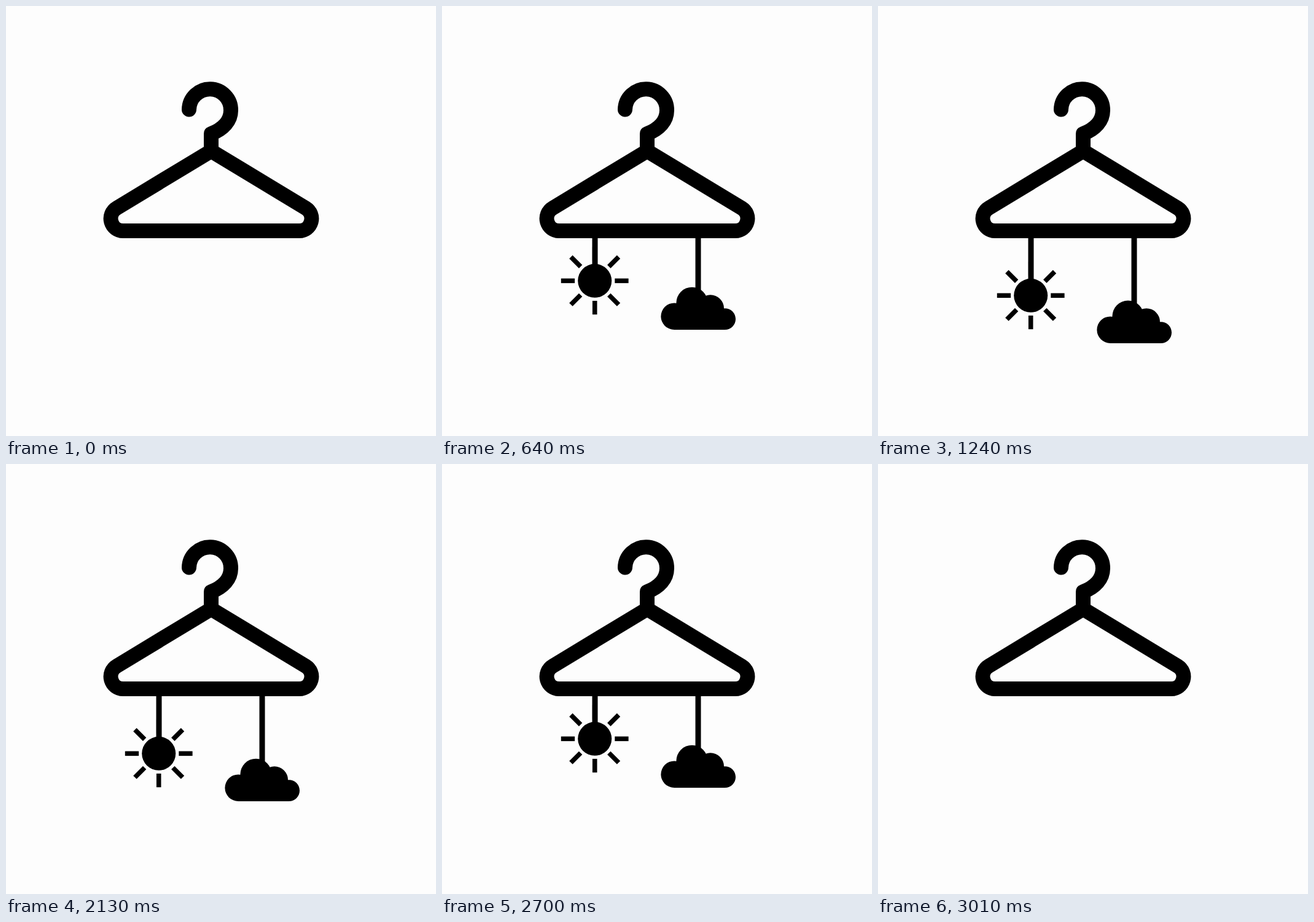
These frames come from a looping animation (700x700 px, 3340 ms). An HTML page:

```html
<!DOCTYPE html>
<html lang="en">
<head>
<meta charset="utf-8">
<title>Hanger mobile</title>
<style>
  html, body { margin: 0; width: 100%; height: 100%; overflow: hidden; background: #fdfdfd; }
  svg { display: block; width: 100vw; height: 100vh; }
  .line { fill: none; stroke: #000; stroke-width: 24; }
  .string { stroke: #000; stroke-width: 9; }
</style>
</head>
<body>
<svg viewBox="0 0 700 700">
  <path class="string" id="sunString" />
  <path class="string" id="cloudString" />

  <g id="sun">
    <circle cx="248.7" cy="471.3" r="27.5" />
    <g id="rays" stroke="#000" stroke-width="7.6"></g>
  </g>

  <g id="cloud">
    <circle cx="378.2" cy="527.2" r="21.8" />
    <circle cx="407" cy="505.2" r="25.6" />
    <circle cx="437" cy="514.2" r="22" />
    <circle cx="460.6" cy="531.6" r="17.4" />
    <rect x="378" y="520" width="82.6" height="29" />
  </g>

  <path class="line" stroke-linecap="round" stroke-linejoin="round"
    d="M298 168.5 A34 34 0 0 1 366 170 C366 187 354 200 334 208 V236" />
  <path class="line"
    d="M334 236 L180.2 328.9 A20 20 0 0 0 190.5 366 H477.5 A20 20 0 0 0 487.8 328.9 Z" />
</svg>
<script>
  const LOOP = 3340;
  const HALF = 1670;
  const CLOUD_RATIO = 11 / 12;

  // time (ms), sun offset below rest (px), speed (px/ms)
  const KEYS = [
    [330, 300, -1],
    [420, 194, -1.4],
    [646, -24.2, 0],
    [798, 7.5, 0],
    [940, -3, 0],
    [1090, 0.6, 0],
    [1230, 0, 0]
  ];

  const byId = id => document.getElementById(id);
  const sun = byId('sun');
  const cloud = byId('cloud');
  const sunString = byId('sunString');
  const cloudString = byId('cloudString');

  for (let angle = 0; angle < 360; angle += 45) {
    const ray = document.createElementNS('http://www.w3.org/2000/svg', 'path');
    ray.setAttribute('d', 'M281.3 471.3 H303.6');
    ray.setAttribute('transform', `rotate(${angle} 248.7 471.3)`);
    byId('rays').append(ray);
  }

  // Cubic Hermite between neighbouring keys
  function offsetAt(t) {
    const i = KEYS.findIndex(key => key[0] > t);
    if (i === 0) return KEYS[0][1];
    if (i < 0) return 0;
    const [t0, p0, v0] = KEYS[i - 1];
    const [t1, p1, v1] = KEYS[i];
    const d = t1 - t0;
    const u = (t - t0) / d;
    const w = 1 - u;
    return p0 * w * w * (1 + 2 * u) + p1 * u * u * (3 - 2 * u)
      + d * u * w * (v0 * w - v1 * u);
  }

  // Share of the string that has dropped out of the hanger
  function dropAt(t) {
    const u = Math.min(1, Math.max(0, (t - 430) / 160));
    return (1 - Math.cos(Math.PI * u)) / 2;
  }

  // The second half plays the first backwards, in 30 ms steps
  function stepTime(now) {
    let t = now % LOOP;
    if (t > HALF) t = LOOP + 29.9 - t;
    const shift = t < 520 ? 0 : 10;
    return Math.floor((t - shift) / 30) * 30 + shift;
  }

  function drawString(path, x, length) {
    path.setAttribute('d', `M${x} 366 V${366 + length}`);
  }

  function draw(now) {
    const t = stepTime(now);
    const y = offsetAt(t);
    const drop = dropAt(t);
    sun.setAttribute('transform', `translate(0 ${y})`);
    cloud.setAttribute('transform', `translate(0 ${y * CLOUD_RATIO})`);
    drawString(sunString, 249, 96 * drop);
    drawString(cloudString, 417, 134 * drop);
  }

  const start = performance.now();
  function tick() {
    draw(performance.now() - start);
    requestAnimationFrame(tick);
  }
  tick();
</script>
</body>
</html>
```
